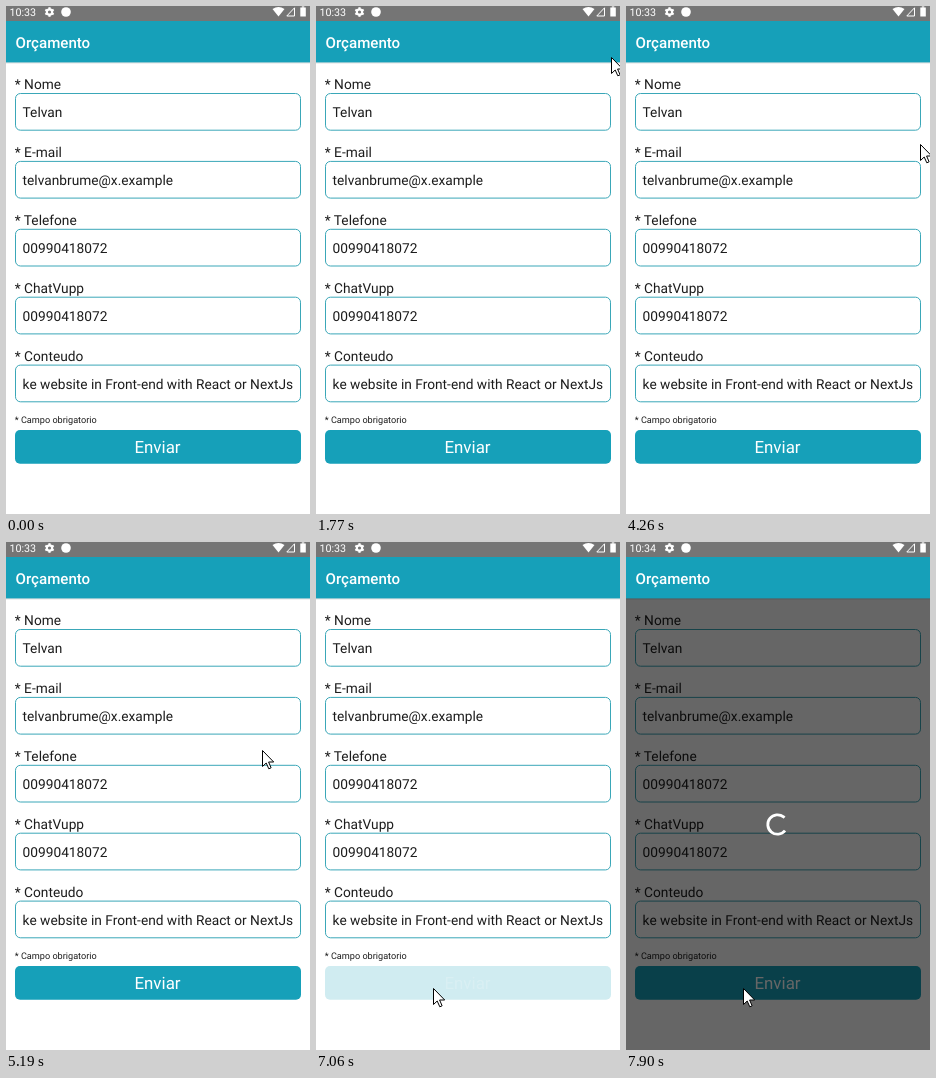
These frames come from a looping animation (304 px wide and 508 px high, 7.99 s). An HTML page with a canvas:

```html
<!DOCTYPE html>
<html lang="pt">
<head>
<meta charset="utf-8">
<title>Orçamento</title>
<style>
html, body { margin: 0; width: 100%; height: 100%; overflow: hidden; background: #fff; }
canvas { display: block; width: 304px; height: 508px; }
</style>
</head>
<body>
<canvas id="stage"></canvas>
<script>
const LOOP = 7990, PRESS = 7060, OVERLAY = 7270, SPINNER = 7340, NEW_MINUTE = 7740;
const TEAL = '#16a0b9', INK = '#1c1c1c', BODY_SIZE = 13.72;
const FIELDS = [
  ['Nome', 'Telvan'],
  ['E-mail', 'telvanbrume@x.example'],
  ['Telefone', '00990418072'],
  ['ChatVupp', '00990418072'],
  ['Conteudo', 'ke website in Front-end with React or NextJs'],
];

const linear = p => p;
const easeIn = p => p ** 1.85;
const easeOut = p => 1 - (1 - p) ** 2.15;
const easeInOut = p => p * p * (3 - 2 * p);

// start, step length, steps, from, to, easing of x and y
const MOVES = [
  [300, 76.7, 10, [244, 520], [288, 73], linear, easeOut],
  [1160, 80, 1, [288, 73], [288, 72], linear, linear],
  [1710, 60, 2, [288, 72], [295, 51], linear, linear],
  [3100, 80, 3, [295, 51], [305, 69], linear, linear],
  [3640, 78, 11, [306, 111], [288, 150], easeIn, easeIn],
  [4570, 76, 11, [288, 150], [253, 214], easeInOut, easeInOut],
  [5410, 77, 11, [253, 214], [107, 384], easeOut, easeIn],
  [6260, 77.5, 5, [107, 384], [117, 446], linear, easeOut],
];

const canvas = document.getElementById('stage');
const ctx = canvas.getContext('2d');
const ratio = window.devicePixelRatio || 1;
canvas.width = 304 * ratio;
canvas.height = 508 * ratio;
ctx.textRendering = 'geometricPrecision';

const stepCount = (t, start, length) => Math.floor((t - start) / length + 0.1);

function text(value, x, y, size, color = INK, weight = 400, align = 'left') {
  ctx.font = `${weight} ${size}px Roboto, sans-serif`;
  ctx.textAlign = align;
  ctx.fillStyle = color;
  ctx.fillText(value, x, y);
}

function rect(x, y, w, h, color) {
  ctx.fillStyle = color;
  ctx.fillRect(x, y, w, h);
}

function roundedPath(x, y, w, h, r) {
  ctx.beginPath();
  ctx.roundRect(x, y, w, h, r);
}

function circle(x, y, r) {
  ctx.beginPath();
  ctx.arc(x, y, r, 0, 2 * Math.PI);
}

function polygon(points) {
  ctx.beginPath();
  points.forEach(([x, y]) => ctx.lineTo(x, y));
  ctx.closePath();
}

function drawStatusBar(t) {
  rect(0, 0, 304, 15, '#757575');
  text(t < NEW_MINUTE ? '10:33' : '10:34', 3.5, 10, 10.7, '#fff');

  ctx.strokeStyle = ctx.fillStyle = '#fff';
  ctx.lineWidth = 2.2;
  circle(43.5, 6, 2.7);
  ctx.stroke();
  for (let i = 0; i < 6; i++) {
    ctx.save();
    ctx.translate(43.5, 6);
    ctx.rotate(i * Math.PI / 3);
    ctx.fillRect(-1.1, -4.8, 2.2, 2);
    ctx.restore();
  }
  circle(60, 6, 4.8);
  ctx.fill();

  ctx.beginPath();
  ctx.moveTo(272.5, 10.5);
  ctx.lineTo(266.5, 3);
  ctx.quadraticCurveTo(272.5, -1, 278.5, 3);
  ctx.fill();

  ctx.lineWidth = 1;
  polygon([[288.5, 1.8], [288.5, 10], [280.8, 10]]);
  ctx.stroke();
  ctx.fillRect(294.3, 1.5, 5.5, 9);
  ctx.fillRect(295.8, 0.4, 2.5, 1.2);
}

function drawForm(t) {
  rect(0, 0, 304, 508, '#fff');
  FIELDS.forEach(([label, value], i) => {
    const y = i * 67.9;
    text('* ' + label, 8.8, 83 + y, BODY_SIZE);
    roundedPath(9.5, 87.5 + y, 285, 36.7, 5);
    ctx.strokeStyle = '#3aa7b8';
    ctx.lineWidth = 1;
    ctx.stroke();
    text(value, 16.6, 111 + y, BODY_SIZE);
  });
  text('* Campo obrigatorio', 8.7, 417, 9.15);

  const release = Math.min(1, Math.max(0, (t - OVERLAY) / 250));
  ctx.globalAlpha = t < PRESS ? 1 : 0.2 + 0.8 * easeInOut(release);
  roundedPath(9, 424.1, 286, 33.6, 5);
  ctx.fillStyle = TEAL;
  ctx.fill();
  text('Enviar', 151.5, 447, 16.9, '#fff', 400, 'center');
  ctx.globalAlpha = 1;
}

function drawHeader() {
  rect(0, 56, 304, 1.5, 'rgba(0,0,0,0.12)');
  rect(0, 15, 304, 41.4, TEAL);
  text('Orçamento', 9.5, 41.6, 15.1, '#fff', 500);
}

function drawSpinner(age) {
  const start = -90 + age * 720 / 4444 + age * 90 / 1333;
  const sweep = 10 + 270 * easeInOut(Math.min(1, age / 600));
  const radians = Math.PI / 180;
  ctx.beginPath();
  ctx.arc(151.5, 282.5, 9.7, start * radians, (start + sweep) * radians);
  ctx.strokeStyle = '#fff';
  ctx.lineWidth = 2.8;
  ctx.stroke();
}

function drawCursor(t) {
  const move = MOVES.findLast(m => t >= m[0]);
  if (!move) return;
  const [start, length, steps, from, to, easeX, easeY] = move;
  const p = Math.min(1, (stepCount(t, start, length) + 1) / steps);
  const x = from[0] + (to[0] - from[0]) * easeX(p);
  const y = from[1] + (to[1] - from[1]) * easeY(p);
  ctx.save();
  ctx.translate(Math.round(x) + 0.5, Math.round(y) + 0.5);
  polygon([[0, 0], [0, 16], [3.7, 12.5], [6.3, 18.3], [8.6, 17.3], [6.1, 11.5], [11.2, 11.5]]);
  ctx.fillStyle = '#fff';
  ctx.strokeStyle = '#000';
  ctx.lineWidth = 1;
  ctx.fill();
  ctx.stroke();
  ctx.restore();
}

function draw(now) {
  let t = now % LOOP;
  if (t >= OVERLAY) t = OVERLAY + 79 * Math.min(8, stepCount(t, OVERLAY, 79));
  ctx.setTransform(ratio, 0, 0, ratio, 0, 0);
  drawForm(t);
  if (t >= OVERLAY) rect(0, 56, 304, 452, 'rgba(0,0,0,0.6)');
  drawHeader();
  drawStatusBar(t);
  if (t >= SPINNER) drawSpinner(t - SPINNER);
  drawCursor(t);
}

const origin = performance.now();
function tick() {
  draw(performance.now() - origin);
  requestAnimationFrame(tick);
}
tick();
</script>
</body>
</html>
```
